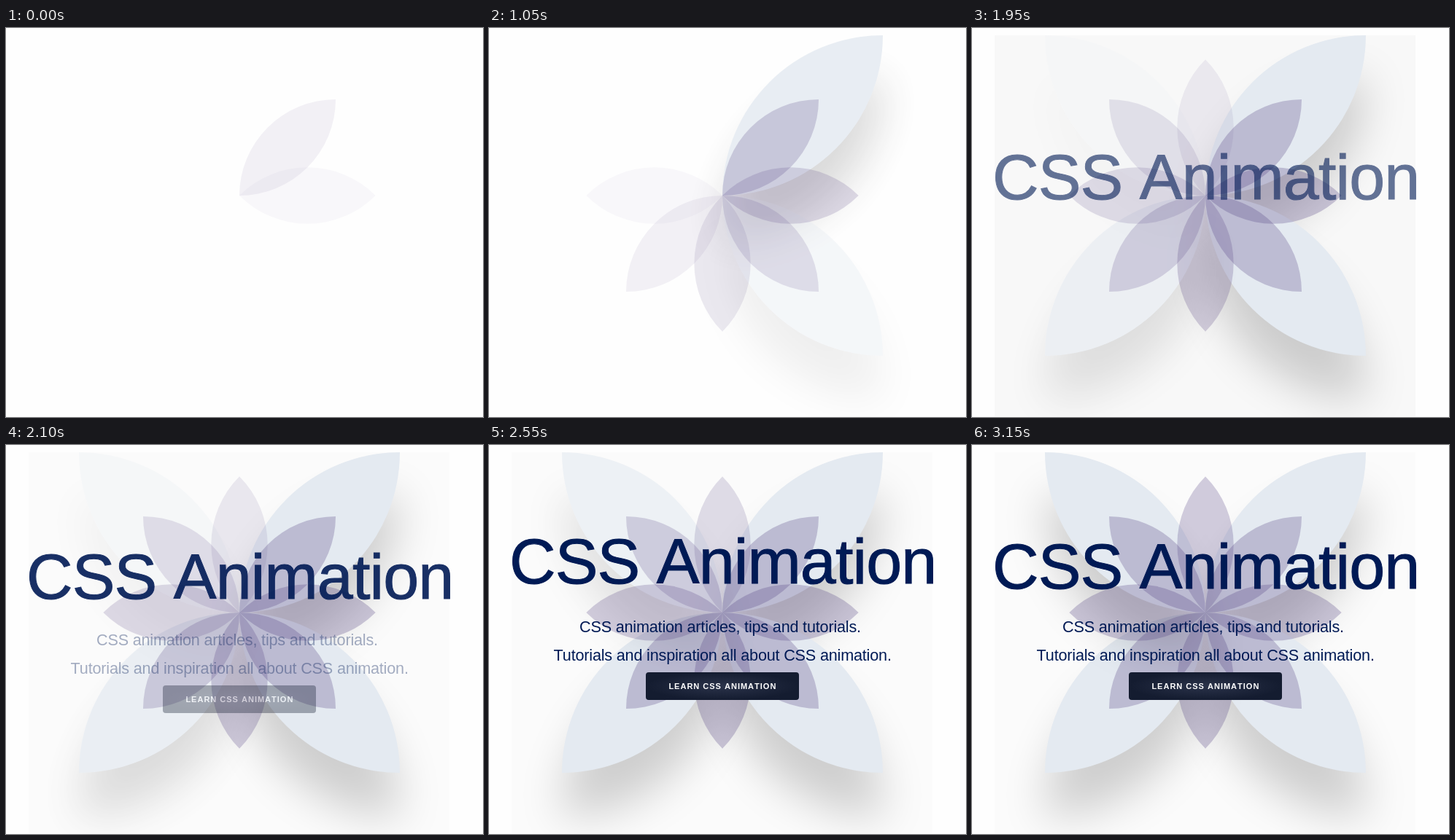
Write an HTML page that moves like this. It is 654 px wide and 534 px high and loops after 3.53 s.

```html
<!DOCTYPE html>
<html lang="en">
<head>
<meta charset="utf-8">
<title>CSS Animation</title>
<style>
  html, body { margin: 0; width: 100%; height: 100%; overflow: hidden; background: #fefefe; }
  #stage { position: relative; width: 654px; height: 534px; overflow: hidden; }
  #stage > * { position: absolute; }
  #panel { left: 31px; top: 10px; width: 577px; height: 523px; }
  .big { width: 220px; height: 220px; background: #e4eaf1; box-shadow: 0 60px 60px rgba(0, 0, 0, .18); }
  .small {
    left: 320px; top: 98px; width: 132px; height: 132px;
    border-radius: 100% 0; transform-origin: 0 100%;
    background: rgba(84, 64, 128, .28);
  }
  svg { left: 0; top: 0; }
  text { font-family: "Liberation Sans", Arial, sans-serif; fill: #001a55; }
  #title { font-size: 88px; letter-spacing: -.01em; font-kerning: none; stroke: #001a55; stroke-width: 1px; }
  .line { font-size: 21.6px; letter-spacing: -.18px; }
  .label { font-size: 11px; font-weight: bold; letter-spacing: 1px; font-kerning: none; fill: #fff; }
</style>
</head>
<body>
<div id="stage">
  <div id="panel"></div>
  <svg id="copy" width="654" height="534">
    <defs>
      <radialGradient id="glow">
        <stop offset="0" stop-color="#2b334a"/>
        <stop offset="1" stop-color="#141c30"/>
      </radialGradient>
    </defs>
    <text id="title" x="28">CSS Animation</text>
    <g id="intro">
      <text class="line" x="124" y="257">CSS animation articles, tips and tutorials.</text>
      <text class="line" x="88.6" y="296">Tutorials and inspiration all about CSS animation.</text>
      <rect x="215" y="312" width="210" height="38" rx="4" fill="url(#glow)"/>
      <text class="label" x="246.4" y="335">LEARN CSS ANIMATION</text>
    </g>
  </svg>
</div>
<script>
const LOOP = 3530, STEP = 150;
const $ = id => document.getElementById(id);
const clamp = x => Math.min(1, Math.max(0, x));
const petals = [];

function addPetal(className, start, duration, style) {
  const el = document.createElement('div');
  el.className = className;
  Object.assign(el.style, style);
  $('stage').insertBefore(el, $('copy'));
  petals.push({ el, start, duration });
}

// Large petals clockwise from the top right, then the small ones above them.
[[320, 10], [320, 230], [100, 230], [100, 10]].forEach(([x, y], i) =>
  addPetal('big', 20 + 600 * i, 1250, {
    left: x + 'px', top: y + 'px', borderRadius: i % 2 ? '0 100%' : '100% 0'
  }));
for (let i = 0; i < 8; i++)
  addPetal('small', -520 + 263 * i, 2000, { transform: `rotate(${45 * i}deg)` });

// Linear path through values spaced one step apart.
function path(t, start, values) {
  const p = Math.min(values.length - 1, Math.max(0, (t - start) / STEP));
  const i = Math.floor(p), a = values[i], b = values[i + 1] ?? a;
  return a + (b - a) * (p - i);
}

// The picture moves in held steps, twice as long during the opening.
function hold(t) {
  if (t < 1350) return Math.max(0, Math.floor((t + STEP) / 300) * 300 - STEP);
  return Math.min(3150, Math.floor(t / STEP) * STEP);
}

function draw(now) {
  const t = hold(now % LOOP);
  for (const { el, start, duration } of petals)
    el.style.opacity = clamp((t - start) / duration);

  $('panel').style.background = t < 1950 ? 'none' : t < 2100 ? '#f8f8f8' : '#fbfbfb';

  $('title').setAttribute('y', path(t, 1950, [234.5, 210.5, 197.5, 190.5, 189.5, 191.5, 195.5, 196.5]));
  $('title').setAttribute('opacity', path(t, 1800, [0, .6, .9, 1]));

  const drop = path(t, 2100, [18, 7, 3, 0, -.5, -.5, 0]);
  $('intro').setAttribute('transform', `translate(0 ${drop})`);
  $('intro').setAttribute('opacity', path(t, 1950, [0, .35, .75, .92, 1]));
  requestAnimationFrame(draw);
}
requestAnimationFrame(draw);
</script>
</body>
</html>
```
